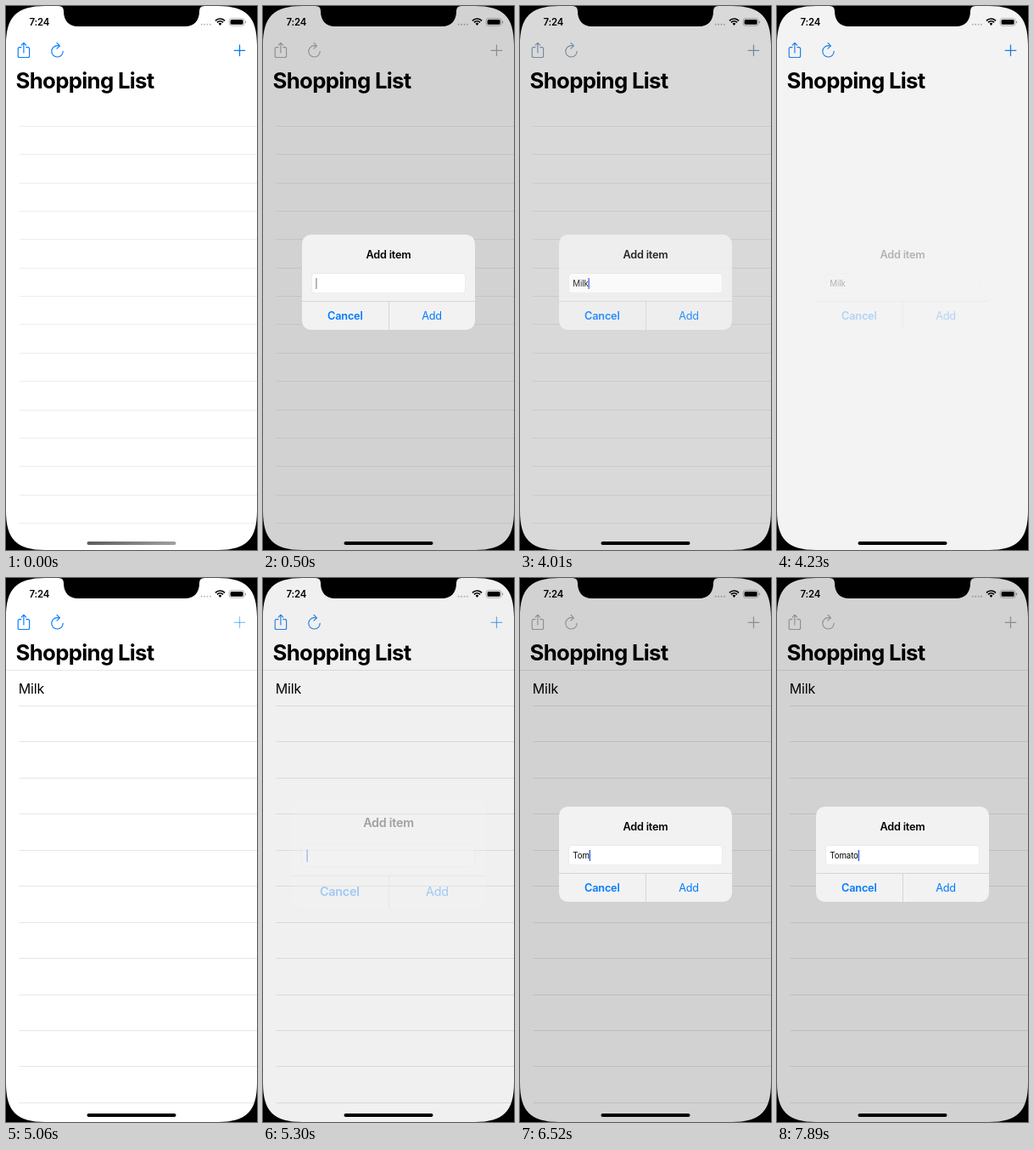
An HTML page with a canvas that plays this animation: 296 by 640 pixels, repeating every 8000 ms.

```html
<!DOCTYPE html>
<html lang="en">
<head>
<meta charset="utf-8">
<title>Shopping List</title>
<style>
  html, body { margin: 0; width: 100%; height: 100%; overflow: hidden; background: #000; }
  canvas { display: block; width: 296px; height: 640px; }
</style>
</head>
<body>
<canvas id="stage"></canvas>
<script>
const W = 296, H = 640, LOOP = 8000, BEAT = 110;
const FIRST_OPEN = 500, DISMISS = 4010, REOPEN = 5060;
const BLUE = [0, 122, 255], GREY = [172, 172, 172];

// One session per opening of the dialog: when the caret wakes, and when each letter is typed.
const sessions = [
  { word: 'Milk', focus: 920, keys: [1770, 2050, 2240, 2690] },
  { word: 'Tomato', focus: 5300, keys: Array.from('Tomato', (_, i) => 5880 + i * 230) },
];

const canvas = document.getElementById('stage');
const ctx = canvas.getContext('2d');
const ratio = window.devicePixelRatio || 1;
canvas.width = W * ratio;
canvas.height = H * ratio;

const clamp = v => Math.min(1, Math.max(0, v));
const smooth = v => clamp(v) ** 2 * (3 - 2 * clamp(v));
const beats = (t, start) => Math.floor((t - start) / BEAT);
const mix = (a, b, k) => `rgb(${a.map((v, i) => Math.round(v + (b[i] - v) * k))})`;

function dialogOpacity(t) {
  if (t < FIRST_OPEN) return 0;
  if (t < DISMISS) return 1;
  if (t < REOPEN) return clamp(1 - (beats(t, DISMISS) + .5) / 4) ** 1.35;
  return smooth(beats(t, REOPEN) * .345 - .3);
}

function typing(t) {
  const { word, focus, keys } = sessions[t < REOPEN ? 0 : 1];
  const count = keys.filter(key => key <= t).length;
  const since = count ? keys[count - 1] : focus;
  const phase = (t - since) % 860;
  const caret = t < since ? .5 : phase < 500 ? 1 : phase < 500 + BEAT ? .4 : 0;
  return { typed: word.slice(0, count), caret, waking: t < since };
}

function text(str, x, y, size, { weight = 400, color = '#000', align = 'left', spacing = -.2 } = {}) {
  ctx.font = `${weight} ${size}px Inter, sans-serif`;
  ctx.letterSpacing = spacing + 'px';
  ctx.textAlign = align;
  ctx.fillStyle = color;
  ctx.fillText(str, x, y);
  return ctx.measureText(str).width;
}

function rounded(x, y, w, h, r, color) {
  ctx.beginPath();
  ctx.roundRect(x, y, w, h, r);
  ctx.fillStyle = color;
  ctx.fill();
}

function line(color, width, ...points) {
  ctx.beginPath();
  points.forEach(([x, y]) => ctx.lineTo(x, y));
  ctx.strokeStyle = color;
  ctx.lineWidth = width;
  ctx.stroke();
}

function drawRows(pitch, color) {
  ctx.fillStyle = color;
  for (let y = 108 + pitch; y < H; y += pitch) ctx.fillRect(15.5, Math.round(y - .5), W, 1);
}

function drawList(t) {
  const step = beats(t, DISMISS);
  ctx.globalAlpha = clamp(1 - step / 2);
  drawRows(33.37, '#ededed');

  ctx.globalAlpha = clamp((step - 3) / 4);
  drawRows(42.45, '#e6e6e6');
  ctx.fillRect(0, 108, W, 1);
  text('Milk', 14.8, 136, 16);
  ctx.globalAlpha = 1;
}

function drawToolbar(t) {
  const opacity = dialogOpacity(t);
  const tint = mix(BLUE, GREY, opacity ** 1.4);
  ctx.lineCap = ctx.lineJoin = 'round';
  line(tint, 1.15, [18, 48.6], [15.2, 48.6], [14.2, 49.6], [14.2, 59.5], [15.2, 60.5],
    [26.6, 60.5], [27.6, 59.5], [27.6, 49.6], [26.6, 48.6], [23.8, 48.6]);
  line(tint, 1.15, [20.9, 55], [20.9, 43.5]);
  line(tint, 1.15, [18.1, 46.2], [20.9, 43.4], [23.7, 46.2]);

  ctx.beginPath();
  ctx.arc(60.5, 53.3, 6.7, 0, Math.PI * 1.62);
  ctx.stroke();
  line(tint, 1.15, [60, 43.3], [63.4, 46.8], [60, 50.1]);

  // The plus stays pressed while the dialog opens again.
  ctx.globalAlpha = t < REOPEN ? 1 : .45 + .55 * opacity;
  line(tint, 1.3, [269.2, 52.3], [281.8, 52.3]);
  line(tint, 1.3, [275.5, 46], [275.5, 58.6]);
  ctx.globalAlpha = 1;
  ctx.lineCap = 'butt';
}

function drawStatus() {
  text('7:24', 39.4, 23, 11.4, { weight: 600, align: 'center', spacing: -.1 });
  for (let i = 0; i < 4; i++) rounded(229.8 + i * 3.4, 20.8, 1.8, 1.8, .9, '#b0b0b0');

  const fan = r => ctx.arc(252.5, 22.6, r, -Math.PI * .76, -Math.PI * .24);
  ctx.strokeStyle = ctx.fillStyle = '#000';
  ctx.lineWidth = 1.7;
  for (const r of [7.6, 4.8]) {
    ctx.beginPath();
    fan(r);
    ctx.stroke();
  }
  ctx.beginPath();
  ctx.moveTo(252.5, 23);
  fan(2.6);
  ctx.fill();

  ctx.beginPath();
  ctx.roundRect(263.2, 14.6, 17.8, 8.6, 2.6);
  ctx.strokeStyle = '#a6a6a6';
  ctx.lineWidth = .8;
  ctx.stroke();
  rounded(264.6, 16, 15, 5.8, 1.5, '#000');
  rounded(282, 17.6, 1.1, 2.7, .6, '#a6a6a6');
}

function drawField(t, opacity) {
  const { typed, caret, waking } = typing(t);
  rounded(57, 314.5, 182, 23.5, 4.5, '#dfdfdf');
  rounded(57.6, 315.1, 180.8, 22.3, 4, '#fff');
  const width = text(typed, 62.3, 330.2, 9.7, { spacing: -.1 });
  ctx.globalAlpha = opacity * caret;
  ctx.fillStyle = waking ? '#444' : '#3f62e0';
  ctx.fillRect(62.1 + width, 320, 1.5, 13);
  ctx.globalAlpha = opacity;
}

function drawDialog(t) {
  const opacity = dialogOpacity(t);
  ctx.fillStyle = `rgba(0, 0, 0, ${.178 * opacity})`;
  ctx.fillRect(0, 0, W, H);

  const scale = t < REOPEN ? 1 : 1 + .19 * (1 - opacity);
  const blue = mix(BLUE, BLUE, 0);
  ctx.save();
  ctx.globalAlpha = opacity;
  ctx.translate(148, 325);
  ctx.scale(scale, scale);
  ctx.translate(-148, -325);
  rounded(46, 269, 204, 112, 10.5, '#f2f2f2');
  text('Add item', 148, 296.6, 12.7, { weight: 600, align: 'center' });
  drawField(t, opacity);
  ctx.fillStyle = '#d6d6d6';
  ctx.fillRect(46, 347, 204, 1);
  ctx.fillRect(148, 348, 1, 33);
  text('Cancel', 96.8, 368.8, 12.7, { weight: 600, color: blue, align: 'center' });
  text('Add', 199, 368.8, 12.7, { color: blue, align: 'center' });
  ctx.restore();
}

function drawIndicator(t) {
  let color = '#000';
  if (t < FIRST_OPEN) {
    color = ctx.createLinearGradient(95, 0, 201, 0);
    color.addColorStop(0, '#5c5c5c');
    color.addColorStop(1, '#a0a0a0');
  }
  rounded(95.5, 630, 105, 4, 2, color);
}

function drawBezel() {
  const r = 46, c = 12.6;
  ctx.fillStyle = '#000';
  for (const [sx, sy] of [[1, 1], [-1, 1], [1, -1], [-1, -1]]) {
    ctx.save();
    ctx.translate(sx > 0 ? 0 : W, sy > 0 ? 0 : H);
    ctx.scale(sx, sy);
    ctx.beginPath();
    ctx.moveTo(0, 0);
    ctx.lineTo(0, r);
    ctx.bezierCurveTo(0, c, c, 0, r, 0);
    ctx.fill();
    ctx.restore();
  }
  ctx.beginPath();
  ctx.moveTo(62, 0);
  ctx.quadraticCurveTo(68, 0, 68, 6);
  ctx.bezierCurveTo(68, 17, 74, 24, 85, 24);
  ctx.lineTo(211, 24);
  ctx.bezierCurveTo(222, 24, 228, 17, 228, 6);
  ctx.quadraticCurveTo(228, 0, 234, 0);
  ctx.fill();
}

function draw(t) {
  ctx.setTransform(ratio, 0, 0, ratio, 0, 0);
  ctx.fillStyle = '#fff';
  ctx.fillRect(0, 0, W, H);
  drawList(t);
  drawToolbar(t);
  text('Shopping List', 11.6, 96.8, 25.8, { weight: 700, spacing: -.72 });
  drawStatus();
  drawDialog(t);
  drawIndicator(t);
  drawBezel();
}

const began = performance.now();
function tick() {
  draw((performance.now() - began) % LOOP);
  requestAnimationFrame(tick);
}
tick();
</script>
</body>
</html>
```
